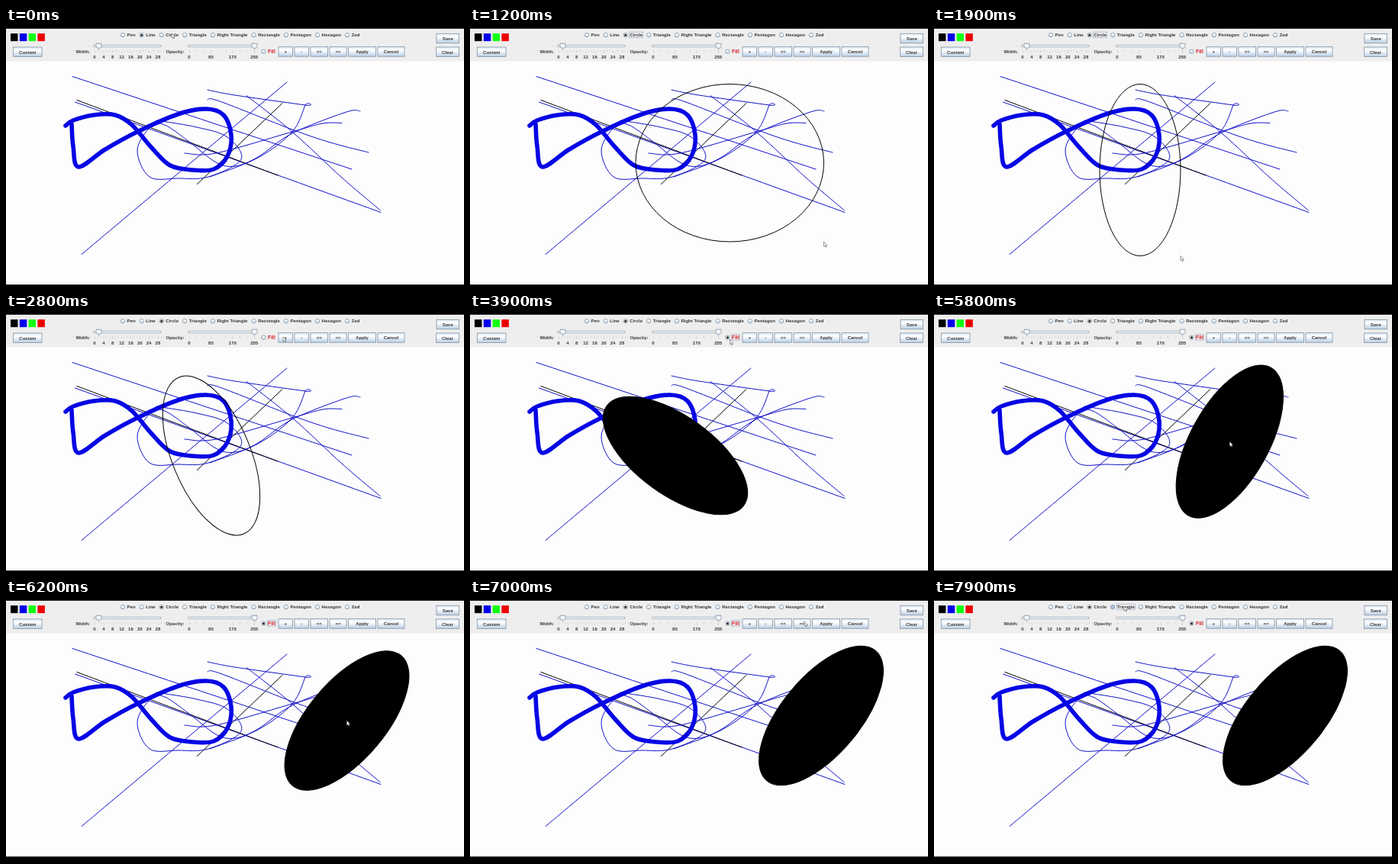
An HTML page for the animation above (8 s loop, 600 by 338 pixels).

```html
<!DOCTYPE html>
<html lang="en">
<head>
<meta charset="utf-8">
<title>Drawing program</title>
<style>
html, body { margin: 0; width: 100%; height: 100%; overflow: hidden; background: #fdfdfe; }
svg { display: block; width: 600px; height: 338px; }
text { font: bold 6px "Liberation Sans", Arial, sans-serif; fill: #383838; }
.mid { text-anchor: middle; }
.red { font-size: 6.7px; fill: #d9202b; }
</style>
</head>
<body>
<svg id="stage" viewBox="0 0 600 338">
  <defs>
    <linearGradient id="metal" x2="0" y2="1">
      <stop offset="0" stop-color="#dfeaf4"/>
      <stop offset=".35" stop-color="#fff"/>
      <stop offset="1" stop-color="#b8cfe5"/>
    </linearGradient>
  </defs>
</svg>
<script>
const stage = document.getElementById('stage');
const BLUE = '#1010c8', METAL = 'url(#metal)', EDGE = '#8294a5';

function set(el, attrs) {
  for (const k in attrs) el.setAttribute(k, attrs[k]);
}
function add(tag, attrs, text) {
  const el = document.createElementNS('http://www.w3.org/2000/svg', tag);
  set(el, attrs);
  if (text) el.textContent = text;
  return stage.appendChild(el);
}
const show = (el, on) => set(el, {visibility: on ? 'visible' : 'hidden'});
const rect = (x, y, width, height, fill, stroke = 'none') =>
  add('rect', {x, y, width, height, fill, stroke, 'stroke-width': .8});
const label = (x, y, text, cls = '') => add('text', {x, y, class: cls}, text);

// Smooth curve through points; a repeated point makes a corner
function curve(points, color = BLUE, width = 1) {
  const p = i => points[Math.min(Math.max(i, 0), points.length - 1)];
  const handle = (i, side) => p(i).map((v, k) => v + side * (p(i + 1)[k] - p(i - 1)[k]) / 6);
  let d = `M${p(0)}`;
  for (let i = 1; i < points.length; i++) d += `C${handle(i - 1, 1)} ${handle(i, -1)} ${p(i)}`;
  add('path', {d, fill: 'none', stroke: color, 'stroke-width': width,
    'stroke-linecap': 'round', 'stroke-linejoin': 'round'});
}

// Drawing already on the canvas
curve([[87, 63.5], [453, 185]]);
curve([[90.5, 97], [491, 241.5]]);
curve([[99, 296.5], [368, 71]]);
curve([[93, 94.5], [356, 193]], '#000');
curve([[250.5, 204.5], [362, 98.5]], '#000');
curve([[264, 94], [280, 96], [375, 133], [425, 150], [475, 163]]);
curve([[315, 88.5], [375, 136], [440, 196], [490, 238.5]]);
curve([[234, 164], [275, 164], [375, 136], [415, 125], [440, 124.5]]);
curve([[264, 81], [300, 88], [392, 101], [392, 101], [375, 136], [330, 170], [267, 195]]);
curve([[464, 109], [446, 110], [375, 138], [330, 169], [300, 181], [275, 176], [240, 149],
  [208, 127], [190, 129], [172, 160], [188, 195], [225, 197], [265, 195], [308, 172],
  [290, 143], [250, 130], [197, 121]]);
curve([[78, 128], [88, 121], [115, 114], [143, 114], [165, 127], [190, 156], [215, 180],
  [245, 186], [272, 185], [290, 168], [295, 140], [285, 114], [262, 106], [225, 113],
  [172, 136], [130, 159], [95, 182], [88, 155], [86, 126]], '#0505e4', 5.6);

const oval = add('ellipse', {stroke: '#000', 'stroke-width': 1});

// Toolbar
rect(0, 0, 600, 43.5, '#eee');
rect(0, 0, 600, 1, '#111');
rect(0, 336, 600, 2, '#111');
['#000', '#00e', '#1f1', '#e00'].forEach((c, i) => rect(6 + i * 11.8, 7.2, 9.5, 10, c));

function button(x, y, w, text) {
  rect(x, y, w, 12.5, METAL, EDGE);
  label(x + w / 2, y + 8.6, text, 'mid');
}
button(9.5, 25, 37.5, 'Custom');
button(564, 7.3, 29.5, 'Save');
button(563.5, 25, 30, 'Clear');
let left = 357;
for (const [text, w] of [['+', 18.5], ['-', 18.5], ['<<', 22.5], ['>>', 22], ['Apply', 36], ['Cancel', 35]]) {
  button(left, 24.7, w, text);
  left += w + 2.5;
}

function slider(name, nameX, x, thumb, count, gap, step) {
  label(nameX, 33, name);
  rect(x, 22.3, 88, 2.5, '#f7f9fb', '#9aabba');
  for (let i = 0; i < count; i++) {
    label(x + 1 + i * gap, 39.7, String(i * step), 'mid');
    for (let j = 0; j < 3; j++) rect(x + 1 + (i + j / 3) * gap, 29.5, .5, j ? 1.5 : 3, '#aaa');
  }
  add('path', {d: `M${thumb - 3.5} 20.3h7v4.5l-3.5 3-3.5-3z`, fill: METAL, stroke: EDGE, 'stroke-width': .8});
}
slider('Width:', 91.5, 115, 121.5, 8, 11.85, 4);
slider('Opacity:', 209.5, 239, 325.5, 4, 28.4, 85);

function radio(cx, cy, text, cls) {
  const ring = add('circle', {cx, cy, r: 2.7, fill: METAL, stroke: EDGE, 'stroke-width': .8});
  const dot = add('circle', {cx, cy, r: 1.5, fill: '#222'});
  const name = label(cx + 5.6, cy + 2.1, text, cls);
  return {ring, dot, x: cx + 5, y: cy - 4, width: name.getComputedTextLength()};
}
left = 153;
const tools = ['Pen', 'Line', 'Circle', 'Triangle', 'Right Triangle', 'Rectangle', 'Pentagon',
  'Hexagon', 'Zad'].map(text => {
  const r = radio(left, 9.2, text);
  left += r.width + 13.7;
  return r;
});
const fill = radio(337.5, 30.7, 'Fill', 'red');
const focus = rect(0, 0, 0, 7.5, 'none', '#a9b7c9');
const cursor = add('path', {d: 'M0 0v6.2l1.5-1.2 1 2.2 1-.5-1-2.1h1.8z',
  fill: '#fff', stroke: '#555', 'stroke-width': .6});

// Pointer stops: time, x, y
const stops = [[0, 217, 7], [200, 212, 9], [500, 217, 73.5], [900, 466, 288], [1200, 463.5, 280],
  [1900, 323, 298.5], [2300, 363, 30], [2800, 363, 30], [3200, 444, 32], [3800, 340.5, 33.5],
  [3900, 340.5, 33.5], [4200, 366, 29], [4500, 366, 29], [5000, 268.5, 185]];
const leave = [[6600, 460.5, 152], [7000, 438, 28], [7400, 470, 190], [7800, 249, 8], [8000, 249, 8]];

const ramp = (t, from, to) => Math.min(Math.max((t - from) / (to - from), 0), 1);

function along(keys, t) {
  const i = keys.findIndex(k => k[0] > t), a = keys[i - 1], b = keys[i];
  const u = ramp(t, a[0], b[0]);
  return [a[1] + (b[1] - a[1]) * u, a[2] + (b[2] - a[2]) * u];
}

function draw(now) {
  const t = Math.floor(now % 8000 / 100) * 100;
  const drag = ramp(t, 5000, 6200), nudge = ramp(t, 6200, 6400);
  let cx = 269 + 177.5 * drag + 13.5 * nudge;
  let cy = 185.5 - 27.5 * drag - 6.5 * nudge;
  let rx = 51.3, ry = 111;

  const pointer = t < 5000 ? along(stops, t) : t < 6600 ? [cx, cy] : along(leave, t);
  set(cursor, {transform: `translate(${pointer})`});

  if (t < 2000) {
    rx = Math.max(0, (pointer[0] - 217) / 2);
    ry = Math.max(0, (pointer[1] - 73.5) / 2);
    cx = 217 + rx;
    cy = 73.5 + ry;
  }
  const angle = 40 * ramp(t, 5000, 6100) + 54 * (ramp(t, 4100, 4900) - ramp(t, 2300, 3500));
  const filled = t >= 3800, hover = t >= 7800;
  set(oval, {cx, cy, rx, ry, fill: filled ? '#000' : 'none', transform: `rotate(${angle} ${cx} ${cy})`});
  show(oval, t > 500);

  tools.forEach((r, i) => show(r.dot, i === (t < 200 ? 1 : 2)));
  show(fill.dot, filled);
  set(tools[3].ring, {fill: hover ? '#a9c4e2' : METAL});
  const {x, y, width} = hover ? tools[3] : filled ? fill : tools[2];
  set(focus, {x, y, width: width + 1.2});
  show(focus, filled || t >= 200 && t < 2400);
}

const start = performance.now();
function tick() {
  draw(performance.now() - start);
  requestAnimationFrame(tick);
}
tick();
</script>
</body>
</html>
```
